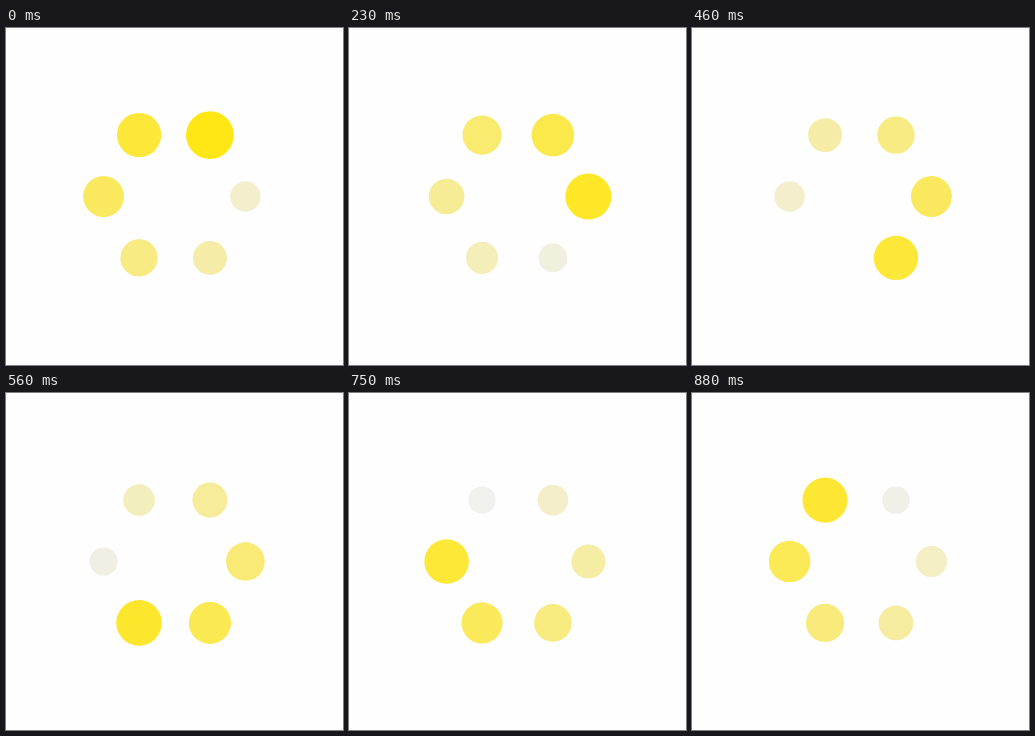
Write an HTML page with a canvas that moves like this. It is 337 px wide and 337 px high and loops after 0.92 s.

```html
<!DOCTYPE html>
<html lang="en">
<head>
<meta charset="utf-8">
<title>Loading spinner</title>
<style>
  html, body { margin: 0; height: 100%; overflow: hidden; background: #fefefe; }
  canvas { display: block; }
</style>
</head>
<body>
<canvas id="stage" width="337" height="337"></canvas>
<script>
const ctx = document.getElementById('stage').getContext('2d');
const STEPS = 28, LOOP = 920, DOTS = 6, CENTER = 168.5, RING = 70.9;
const BRIGHT = [255, 230, 21], FADED = [240, 240, 240];
const LONG_STEPS = [3, 6, 9, 13, 16, 19, 23, 27]; // 40 ms, all others 30 ms

const mix = (a, b, p) => a + (b - a) * p;

function stepAt(time) {
  let step = 0;
  for (let end = 0; step < STEPS; step++) {
    end += LONG_STEPS.includes(step) ? 40 : 30;
    if (time < end) break;
  }
  return step;
}

function drawDot(index, phase) {
  const angle = (index - 1) * Math.PI / 3;
  const rgb = BRIGHT.map((c, i) => Math.round(mix(c, FADED[i], phase)));
  ctx.fillStyle = `rgb(${rgb})`;
  ctx.beginPath();
  ctx.arc(CENTER + RING * Math.cos(angle), CENTER + RING * Math.sin(angle),
    mix(23.9, 13.5, phase), 0, 2 * Math.PI);
  ctx.fill();
}

function draw(now) {
  const step = stepAt(now % LOOP);
  ctx.fillStyle = '#fefefe';
  ctx.fillRect(0, 0, 337, 337);
  for (let i = 0; i < DOTS; i++) {
    // Whole units of 1 / (STEPS * DOTS) keep the phase exact
    const units = (step * DOTS - i * STEPS + STEPS * DOTS) % (STEPS * DOTS);
    // A dot that restarts mid-loop blinks off for one step
    if (units === 0 && step > 0) continue;
    drawDot(i, units / (STEPS * DOTS));
  }
}

const start = performance.now();
function tick() {
  draw(performance.now() - start);
  requestAnimationFrame(tick);
}
tick();
</script>
</body>
</html>
```
